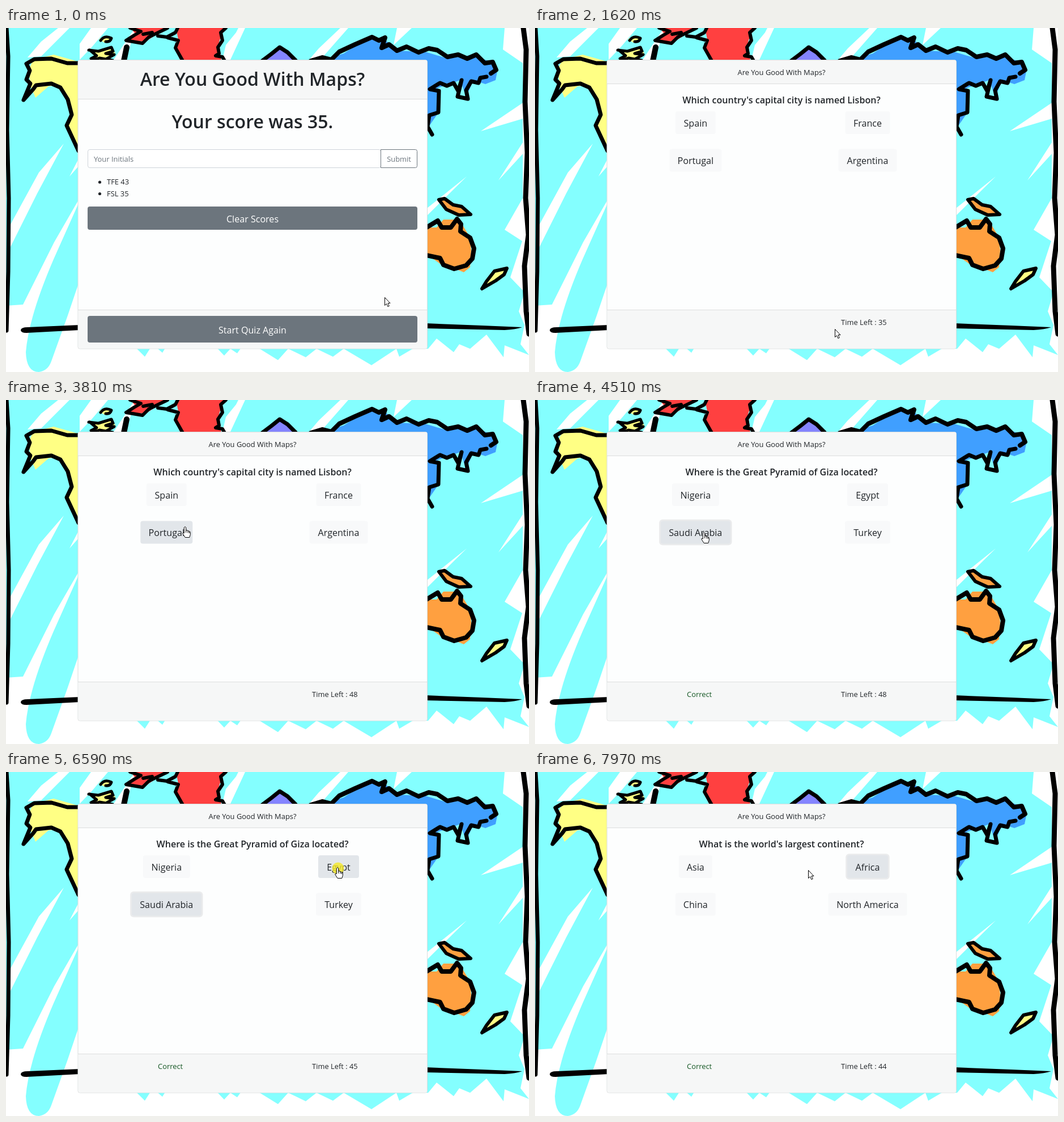
Recreate the animation shown at these times as an HTML page. Size 923 by 607 pixels, loop 8000 ms.

```html
<!DOCTYPE html>
<html lang="en">
<head>
<meta charset="utf-8">
<title>Map quiz</title>
<style>
html, body { margin: 0; width: 100%; height: 100%; overflow: hidden; background: #fff; }
svg { display: block; width: 100%; height: 100%; }
text { font: 400 12.9px "Open Sans", "Noto Sans", sans-serif; fill: #212529; }
.mid { text-anchor: middle; }
.big { font-size: 16.1px; }
.bold { font-size: 16.1px; font-weight: 600; }
.head { font-size: 32.1px; font-weight: 600; }
.muted { fill: #6c757d; }
.light { fill: #fff; }
.sea { fill: #84ffff; }
.gap { fill: #fff; }
.ink { fill: none; stroke: #000; stroke-width: 7; stroke-linecap: round; stroke-linejoin: round; }
.rule { stroke: #dcdddd; }
</style>
</head>
<body>
<svg viewBox="0 0 923 607">
  <rect width="923" height="607" fill="#fff"/>

  <g class="sea">
    <path d="M0 0H880L877 38 912 62V300L880 356 911 376 890 440 915 466 905 500 915 524H740V300H130L85 378 30 488 0 490Z"/>
    <path d="M130 305L84 408Q40 510 35 572Q36 607 58 607Q74 605 80 588L108 510 130 445Z"/>
    <path d="M225 560L245 580 254 566H268L276 573 284 560ZM368 560L385 578 396 566 408 574 418 560ZM438 560L480 586 498 566 529 581 548 566 577 580 596 566 645 595 689 566 694 580 728 560Z"/>
    <path d="M740 524H915L908 558 923 577 880 560 878 581 848 541 819 566 800 558 790 572 760 548 745 566 740 566Z"/>
  </g>
  <g class="gap">
    <path d="M102 204L58 255 5 352V392L55 292ZM62 24L92 0H112L62 50 38 52ZM130 28L150 0H180L152 33 130 56ZM190 56L222 8 230 0 216 40 206 56ZM388 30L406 8 410 0H422L396 56H382ZM535 56L552 36 590 0H604L560 50ZM690 0H716L684 30ZM838 182L912 132V160ZM869 269L912 202V222ZM813 262L743 318V331ZM127 233V245L112 262Z"/>
  </g>

  <g>
    <path fill="#ffff84" d="M48 56L84 47 130 60V218L108 170 118 150 104 117 94 101 75 103 52 123 44 104 40 74ZM164 20Q175 11 187 18Q184 26 174 26ZM146 38L162 41 185 34 193 44 176 52 190 58H152L160 49Z"/>
    <path class="ink" d="M130 62L108 62 80 54 50 55 36 63 42 75 36 91 43 98 31 127 48 108 53 101 80 98 96 105 109 126 116 153 107 172 128 217"/>
    <path class="ink" stroke-width="5" style="stroke-width:5" d="M167 22Q174 12 186 18Q184 25 176 24M146 39L163 41 186 34 189 41 176 45 191 47 178 54M148 39L160 49 150 54M150 58L165 53 188 57"/>
    <path class="ink" style="stroke-width:10" d="M213 34L208 58"/>

    <path fill="#ff4040" d="M220 0H284L268 10 246 24 212 22 228 10ZM300 0H384L376 25 380 58H308L298 36 304 20Z"/>
    <path class="ink" style="stroke-width:6" d="M219 0L238 6 226 13 212 22 241 27 252 16 285 0M242 11L258 8M268 14L284 16 299 8 303 0M285 17L304 22 299 35 312 58M388 0L379 8 382 22 374 34 376 45 370 49 382 51 386 58"/>

    <path fill="#8484ff" d="M458 58L484 36 510 58Z"/>
    <path class="ink" d="M452 58L468 46 483 34 497 43 511 57"/>

    <path fill="#409fff" d="M552 58L596 45 634 20 668 20 690 40 740 42 780 54 820 48 852 58 868 72 864 92 846 99 825 92 812 122 802 92 778 100 762 106 764 148 742 180V58Z"/>
    <path class="ink" style="stroke-width:8" d="M538 58L558 52 574 56 588 42 616 29 646 16 658 22 669 17 663 35 676 29 690 40 707 33 728 43 746 36 761 39 779 51 798 47 814 54 830 47 845 62 859 60 865 74 856 80"/>
    <path class="ink" d="M848 86L837 88 834 97 821 94 812 110 815 125 797 121 804 92 798 111 790 97 778 102 766 97 748 108 764 111 763 149 747 154 744 174 752 188"/>

    <path fill="#ffa040" d="M742 352L760 352 772 338 800 338 818 368 821 392 819 422 808 431 790 424 766 416 742 399Z"/>
    <path class="ink" style="stroke-width:8" d="M742 352L762 340 769 352 785 352 796 337 803 346 802 359 819 370 826 389 823 407 812 419 791 425 772 418 766 406 742 401"/>
    <path class="ink" style="stroke-width:6;fill:#ffa040" d="M764 303L774 301 789 312 804 315 820 329 799 330 777 320Z"/>
    <path class="ink" style="stroke-width:6;fill:#ffff84" d="M840 460L848 447 862 429 884 424 879 435 864 446Z"/>

    <path class="ink" d="M1 0L4 50 2 180 5 300 4 430 1 534"/>
    <path class="ink" style="stroke-width:9" d="M913 0L918 38 916 130 920 220 917 300 922 365 915 420 918 500 923 540"/>
    <path d="M26 533Q27 528 38 528L130 524V533L36 538Q26 538 26 533ZM740 521L840 525 911 528Q900 532 880 533L740 530Z"/>
  </g>

  <rect x="127" y="56.5" width="616.5" height="509.5" rx="3.4" fill="#fdfefe" stroke="#d9dcdc"/>
  <path fill="#f6f7f7" d="M127.5 498H743V563Q743 565.5 740 565.5H130Q127.5 565.5 127.5 563Z"/>
  <path class="rule" d="M127 497.5H743"/>

  <g id="score">
    <path fill="#f6f7f7" d="M127.5 57H743V125H127.5Z"/>
    <path class="rule" d="M127 125.5H743"/>
    <text class="mid head" x="435" y="102">Are You Good With Maps?</text>
    <text class="mid head" x="435" y="177">Your score was 35.</text>
    <rect x="144.5" y="214.5" width="517" height="32" rx="3.4" fill="#fff" stroke="#ced4da"/>
    <text class="muted" x="155" y="236">Your Initials</text>
    <path d="M661.5 214.5H722.5Q725.5 214.5 725.5 217.5V243.5Q725.5 246.5 722.5 246.5H661.5Z" fill="#fff" stroke="#6c757d"/>
    <text class="mid muted" x="693.5" y="236">Submit</text>
    <circle cx="165.5" cy="272" r="2.6" fill="#212529"/>
    <circle cx="165.5" cy="292.5" r="2.6" fill="#212529"/>
    <text x="178" y="276">TFE 43</text>
    <text x="178" y="296.5">FSL 35</text>
    <rect x="144" y="315" width="582" height="41" rx="4" fill="#6c757d"/>
    <text class="mid big light" x="435" y="342.5">Clear Scores</text>
    <rect id="start" x="144" y="508" width="582" height="47" rx="4"/>
    <text class="mid big light" x="435" y="539">Start Quiz Again</text>
  </g>

  <g id="quiz">
    <path fill="#f6f7f7" d="M127.5 57H743V98H127.5Z"/>
    <path class="rule" d="M127 98.5H743"/>
    <text class="mid" x="435" y="83">Are You Good With Maps?</text>
    <text class="mid bold" id="question" x="435" y="133"></text>
    <g id="options"></g>
    <text id="verdict" x="268" y="524" style="fill:#155724">Correct</text>
    <text id="timer" x="540" y="524"></text>
  </g>

  <circle id="spot" r="10.5" fill="#f5e828" opacity=".8"/>
  <g id="pointer" fill="#fff" stroke="#000" stroke-linejoin="round">
    <path id="arrow" d="M.5 .5V14.5L3.6 11.6 5.8 16.6 8.2 15.6 6 10.6H10Z"/>
    <path id="hand" d="M-1.7 12V2Q0-1 1.7 2V7Q4.8 6 5 8.2Q7.2 7.2 7.4 9.2Q9.4 8.6 9.3 11V14.5L7.8 19.5H.2L-3.9 13.2Q-4.6 10 -1.7 12ZM1.7 7V11M5 8.2V11.5M7.4 9.2V12"/>
  </g>
</svg>

<script>
const LOOP = 8000, STEP = 77.4;
const $ = id => document.getElementById(id);

// Each option is a label and a button width; focus is the ringed option.
const rounds = [
  { at: 1620, ask: "Which country's capital city is named Lisbon?", focus: -1,
    options: [["Spain", 71], ["France", 79], ["Portugal", 92], ["Argentina", 103]] },
  { at: 4510, ask: "Where is the Great Pyramid of Giza located?", focus: 2,
    options: [["Nigeria", 83], ["Egypt", 72], ["Saudi Arabia", 123], ["Turkey", 80]] },
  { at: 6660, ask: "What is the world's largest continent?", focus: 1,
    options: [["Asia", 59], ["Africa", 72], ["China", 71], ["North America", 139]] }
];
const ticks = [[1620, 35], [2630, 49], [3630, 48], [4590, 47], [5590, 46], [6590, 45], [7590, 44]];
const clicks = [[1550, 1620], [4430, 4510], [6590, 6660]];

// Pointer path: time, x, y
const path = [
  [155, 668, 475], [310, 660, 459], [390, 644, 458], [540, 580, 492], [700, 536, 526], [770, 529, 531],
  [1703, 529, 531], [2000, 550, 506], [2320, 590, 448], [2550, 597, 425],
  [2630, 592, 395], [2860, 578, 345], [2950, 578, 345], [3015, 580, 343],
  [3250, 520, 282], [3480, 424, 205], [3620, 360, 189], [3800, 314, 224],
  [3870, 302, 254], [4020, 298, 233],
  [4810, 298, 233], [5040, 320, 212], [5350, 368, 172], [5650, 412, 158], [5810, 419, 161],
  [6030, 419, 161], [6270, 500, 164], [6500, 580, 170], [6570, 585, 168],
  [7270, 585, 168], [7500, 560, 170], [7740, 505, 175], [7960, 482, 173]
];

function pointerAt(t) {
  const i = path.findIndex(k => k[0] > t);
  if (i === 0) return path[0].slice(1);
  if (i < 0) return path[path.length - 1].slice(1);
  const [a, b] = [path[i - 1], path[i]];
  const p = (t - a[0]) / (b[0] - a[0]);
  return [1, 2].map(n => Math.round(a[n] + (b[n] - a[n]) * p));
}

const latest = (list, t) => list.filter(k => k[0] <= t).pop();
const inside = (x, y, b) => x >= b.x && x <= b.x + b.w && y >= b.y && y <= b.y + b.h;
const show = (el, on) => el.setAttribute("visibility", on ? "inherit" : "hidden");

function make(tag, attrs, parent) {
  const el = document.createElementNS("http://www.w3.org/2000/svg", tag);
  for (const name in attrs) el.setAttribute(name, attrs[name]);
  return parent.appendChild(el);
}

for (const round of rounds) {
  round.group = make("g", {}, $("options"));
  round.buttons = round.options.map(([label, w], i) => {
    const cx = i % 2 ? 587 : 283.3, y = i < 2 ? 147 : 213.5;
    const box = { x: cx - w / 2, y, w, h: 40 };
    if (i === round.focus) {
      make("rect", { x: box.x - 2.7, y: y - 2.7, width: w + 5.4, height: 45.4, rx: 6,
        fill: "#d8d9db", opacity: .5 }, round.group);
    }
    const rect = make("rect", { x: box.x, y, width: w, height: 40, rx: 4 }, round.group);
    make("text", { x: cx, y: y + 26.8, class: "mid big" }, round.group).textContent = label;
    return { box, rect };
  });
}

const startBox = { x: 144, y: 508, w: 582, h: 47 };

function draw(t) {
  const held = STEP * Math.floor(t / STEP + .07);
  const [x, y] = pointerAt(held);
  const round = rounds.filter(r => r.at <= t).pop();
  let over = false;

  show($("score"), !round);
  show($("quiz"), !!round);
  if (round) {
    $("question").textContent = round.ask;
    $("timer").textContent = "Time Left : " + latest(ticks, t)[1];
    show($("verdict"), round !== rounds[0]);
    rounds.forEach(r => show(r.group, r === round));
    round.buttons.forEach(({ box, rect }, i) => {
      const hit = inside(x, y, box);
      over = over || hit;
      rect.setAttribute("fill", hit || i === round.focus ? "#e2e6ea" : "#f8f9fa");
    });
  } else {
    over = inside(x, y, startBox);
    $("start").setAttribute("fill", over ? "#5a6268" : "#6c757d");
  }

  show($("arrow"), !over);
  show($("hand"), over);
  show($("spot"), clicks.some(([from, to]) => t >= from && t < to));
  $("spot").setAttribute("transform", `translate(${x + 1} ${y + 2})`);
  $("pointer").setAttribute("transform", `translate(${x} ${y})`);
}

const begin = performance.now();
function frame() {
  draw((performance.now() - begin) % LOOP);
  requestAnimationFrame(frame);
}
frame();
</script>
</body>
</html>
```
